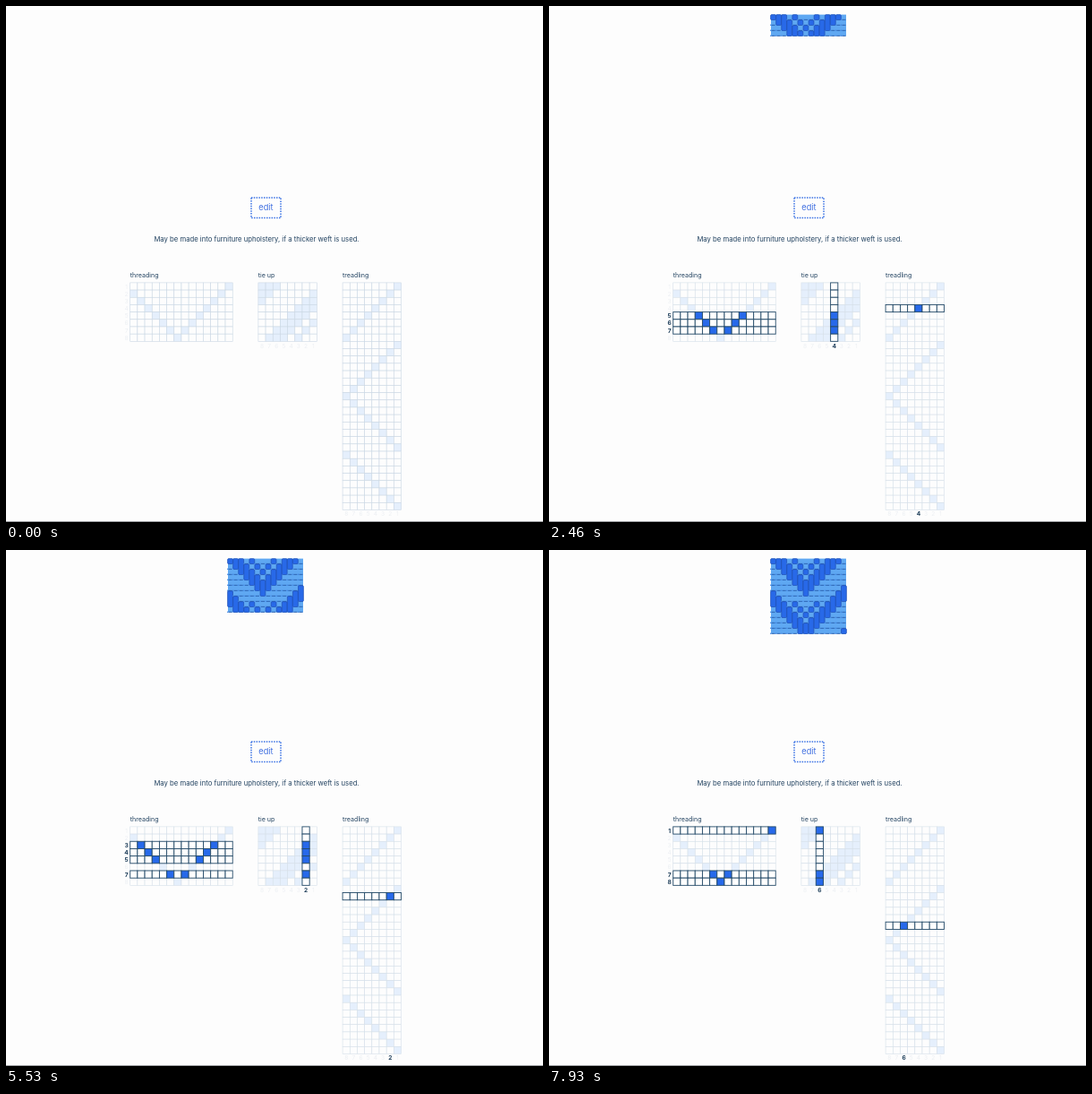
An HTML page that plays this animation: 600x576 px, repeating every 8 s.

```html
<!DOCTYPE html>
<html lang="en">
<head>
<meta charset="utf-8">
<title>Weaving draft</title>
<style>
  html, body { margin: 0; width: 100%; height: 100%; overflow: hidden; background: #fdfdfd; }
  svg { display: block; width: 600px; height: 576px; font-family: Inter, "Open Sans", sans-serif; fill: #234361; }
  .label { font-size: 7.1px; }
  .num { font-size: 6.6px; text-anchor: middle; fill: #eceff3; }
  .num.on { font-weight: 700; fill: #1d3d59; }
</style>
</head>
<body>
<svg viewBox="0 0 600 576">
  <rect x="274" y="214" width="33" height="22.5" fill="none" stroke="#3a72e4" stroke-width="1.5" stroke-dasharray="1.5 1.3"/>
  <text x="290.4" y="228.4" font-size="9.2" text-anchor="middle" fill="#3f6fe0">edit</text>
  <text x="280" y="262.5" font-size="7.7" text-anchor="middle">May be made into furniture upholstery, if a thicker weft is used.</text>
  <text class="label" x="138.7" y="303.2">threading</text>
  <text class="label" x="281.7" y="303.2">tie up</text>
  <text class="label" x="376" y="303.2">treadling</text>
  <rect y="575" width="600" height="1" fill="#a3a5a8"/>
  <g id="draft"></g>
  <g id="cloth"></g>
</svg>
<script>
const LOOP = 8000, FIRST = 60, PICK = 603;
const CELL = 8.18, TOP = 308.9, SHAFTS = 8, WARPS = 14, PICKS = 31;
const THREAD_X = 138.7, TIE_X = 281.9, TREADLE_X = 376.1;
const CLOTH_X = 247.5, CLOTH_Y = 9.6, STITCH = 6.07, ROW = 6;

// Shafts lifted by treadles 1 to 8.
const tieUp = [[2,3,4,6], [3,4,5,7], [4,5,6,8], [5,6,7], [6,7,8], [1,7,8], [1,2,8], [1,2,3]];
const shaftOf = warp => warp < 7 ? warp + 2 : 14 - warp;
const treadleOf = pick => pick < 16 ? pick % 8 + 1 : pick < 23 ? 23 - pick : 31 - pick;
const lifted = (pick, warp) => tieUp[treadleOf(pick) - 1].includes(shaftOf(warp));

const rect = (x, y, w, h, fill, extra = '') =>
  `<rect x="${x.toFixed(2)}" y="${y.toFixed(2)}" width="${w.toFixed(2)}" height="${h.toFixed(2)}" fill="${fill}" ${extra}/>`;
const num = (x, y, n, on) => `<text class="num${on ? ' on' : ''}" x="${x}" y="${y}">${n}</text>`;

// Lit cells are drawn last so that their borders stay on top.
function grid(x, cols, rows, filled, lit, faintLine) {
  let faint = '', bright = '';
  for (let r = 0; r < rows; r++) for (let c = 0; c < cols; c++) {
    const on = lit(c, r), mark = filled(c, r);
    const fill = mark ? (on ? '#2769ea' : '#e5effc') : (on ? '#fff' : '#fdfdfd');
    const stroke = on ? 'stroke="#244a68" stroke-width=".9"' : `stroke="${faintLine}" stroke-width=".6"`;
    const cell = rect(x + c * CELL, TOP + r * CELL, CELL, CELL, fill, stroke);
    if (on) bright += cell; else faint += cell;
  }
  return faint + bright;
}

function drawDraft(pick) {
  const treadle = pick < 0 ? 0 : treadleOf(pick);
  const shafts = treadle ? tieUp[treadle - 1] : [];
  const line = treadle ? '#d6e0e9' : '#cbd8e4';
  let out = grid(THREAD_X, WARPS, SHAFTS, (c, r) => shaftOf(c) === r + 1, (c, r) => shafts.includes(r + 1), line)
    + grid(TIE_X, 8, SHAFTS, (c, r) => tieUp[7 - c].includes(r + 1), c => 8 - c === treadle, line)
    + grid(TREADLE_X, 8, PICKS, (c, r) => 8 - c === treadleOf(r), (c, r) => r === pick, line);
  for (let n = 1; n <= 8; n++) {
    const dx = (8.5 - n) * CELL;
    out += num(134.6, TOP + (n - .5) * CELL + 2.6, n, shafts.includes(n))
      + num(TIE_X + dx, 382, n, n === treadle)
      + num(TREADLE_X + dx, 568.6, n, n === treadle);
  }
  return out;
}

function drawCloth(count) {
  const height = count * ROW;
  if (!count) return '';
  let out = rect(CLOTH_X + .5, CLOTH_Y, WARPS * STITCH - 1, height, '#5fa8f2');
  for (let w = 0; w < WARPS; w++) {
    const x = CLOTH_X + w * STITCH;
    for (let p = 0; p < count; p++) {
      const y = CLOTH_Y + p * ROW;
      if (!lifted(p, w)) {
        out += rect(x + 1, y + ROW - .75, STITCH - 2, .85, '#2358a8');
        out += rect(x - .4, y + ROW - 1, .9, 1.3, '#3d83e4');
        continue;
      }
      const start = p;
      while (p + 1 < count && lifted(p + 1, w)) p++;
      out += rect(x + .1, y + .1, STITCH - .2, (p - start + 1) * ROW - .2, '#2869e8',
        'rx="1.2" stroke="#2050b4" stroke-width=".7"');
    }
  }
  return out;
}

const draft = document.getElementById('draft'), cloth = document.getElementById('cloth');
let shown = null;
function tick(now) {
  const pick = Math.max(-1, Math.floor((now % LOOP - FIRST) / PICK));
  if (pick !== shown) {
    shown = pick;
    draft.innerHTML = drawDraft(pick);
    cloth.innerHTML = drawCloth(pick + 1);
  }
  requestAnimationFrame(play);
}
const begin = performance.now();
function play() { tick(performance.now() - begin); }
play();
</script>
</body>
</html>
```
